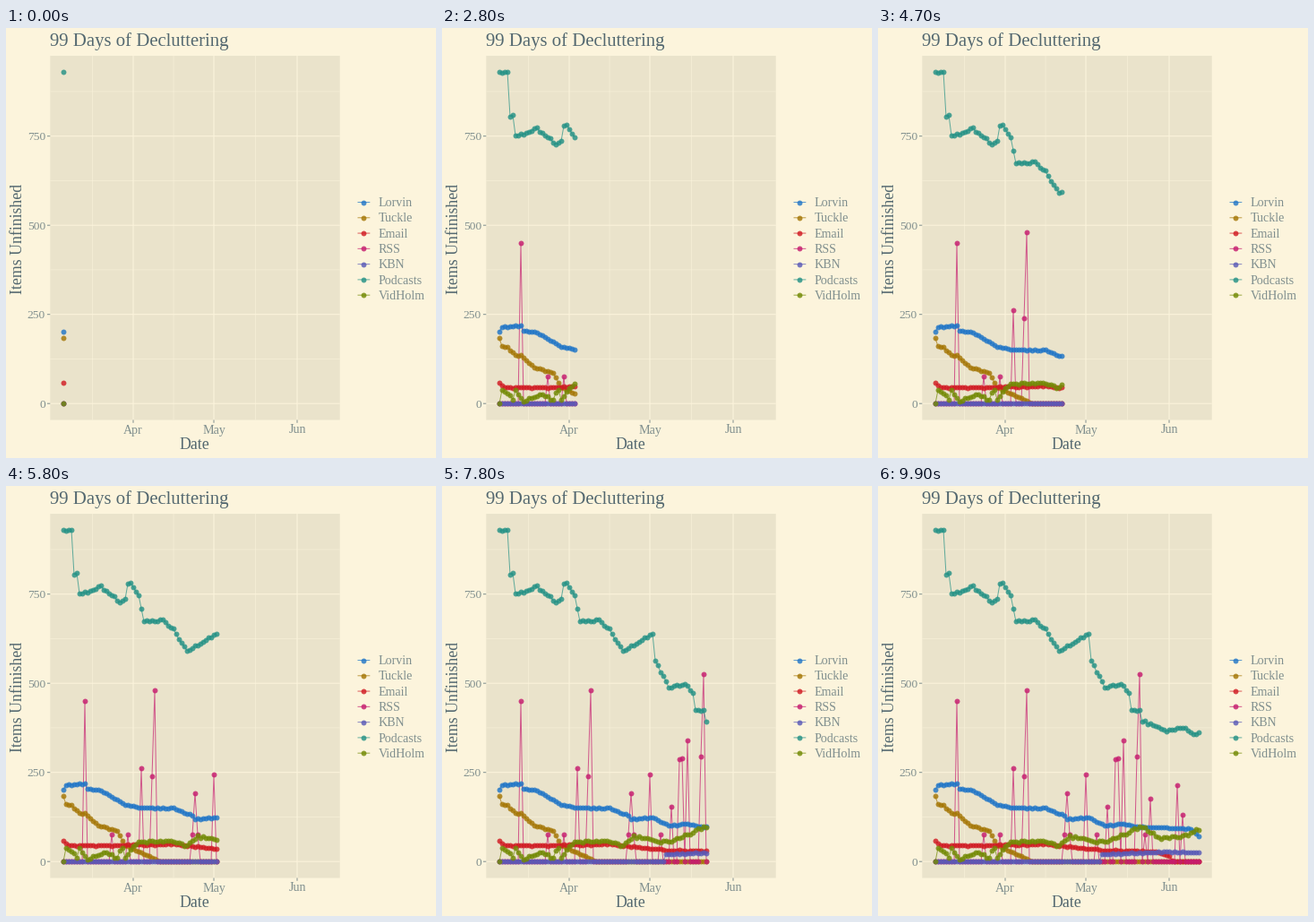
A matplotlib script for the animation above (10000 ms loop, 480x480 px).

```python
import numpy as np
import matplotlib.pyplot as plt
from matplotlib.animation import FuncAnimation
from matplotlib.patches import Rectangle

SIZE, DPI = 480, 80
PT = 72 / DPI  # points per pixel
DAYS, FRAMES = 99, 100

PAPER, PANEL = "#fcf4dc", "#eae3cb"
INK, MUTED = "#536870", "#81908f"
LEFT, RIGHT, TOP, BOTTOM = 49.3, 372.7, 31, 437.5

plt.rcParams["font.family"] = "Liberation Serif"
rng = np.random.default_rng(4)
days = np.arange(DAYS)


def px(day):
    return 64 + 3 * np.asarray(day)


def py(value):
    return 419.2 - 0.398 * np.asarray(value)


def trend(*turns, noise=0):
    """Straight runs between (day, value) turning points, with daily noise."""
    values = np.interp(days, *zip(*turns))
    jitter = rng.uniform(-noise, noise, DAYS)
    return np.where(values > 0, np.maximum(values + jitter, 0), 0)


def bursts(peaks):
    values = np.zeros(DAYS)
    for day, value in peaks.items():
        values[day] = value
    return values


articles = trend((0, 201), (1, 215), (8, 219), (9, 204), (14, 199), (23, 159),
                 (30, 150), (41, 150), (48, 129), (49, 119), (57, 124),
                 (63, 100), (70, 107), (75, 98), (95, 92), (98, 71), noise=1)
saved = trend((0, 183), (1, 161), (3, 158), (6, 135), (8, 135), (13, 101),
              (20, 86), (23, 46), (36, 0), noise=1)
email = trend((0, 57), (2, 44), (33, 47), (41, 50), (50, 41), (65, 31),
              (82, 28), (87, 17), (88, 3), (90, 0), noise=1.5)
rss = bursts({8: 449, 29: 261, 33: 239, 34: 480, 49: 192, 56: 245, 64: 155,
              67: 286, 68: 289, 70: 340, 75: 295, 76: 526, 80: 177, 90: 214,
              92: 132})
rss[[18, 24, 48, 50, 60, 78]] = 75
queue = trend((61, 0), (62, 20), (86, 28), (98, 25), noise=1)
podcasts = trend((0, 928), (3, 929), (4, 806), (5, 808), (6, 750), (14, 771),
                 (21, 728), (23, 735), (24, 777), (25, 785), (28, 745),
                 (30, 672), (37, 678), (41, 650), (46, 590), (57, 639),
                 (58, 563), (63, 489), (69, 499), (72, 471), (73, 424),
                 (76, 424), (77, 394), (86, 367), (93, 376), (95, 360),
                 (98, 359), noise=3)
videos = trend((0, 0), (1, 35), (3, 30), (5, 10), (6, 35), (9, 8), (16, 30),
               (20, 10), (22, 42), (23, 12), (27, 52), (38, 60), (46, 45),
               (50, 70), (63, 54), (77, 99), (84, 64), (93, 73), (98, 93),
               noise=4)

SERIES = [
    ("Lorvin", "#2176c7", articles),
    ("Tuckle", "#a57706", saved),
    ("Email", "#d11c24", email),
    ("RSS", "#c61c6f", rss),
    ("KBN", "#595ab7", queue),
    ("Podcasts", "#259286", podcasts),
    ("VidHolm", "#738a05", videos),
]

fig = plt.figure(figsize=(SIZE / DPI, SIZE / DPI), dpi=DPI, facecolor=PAPER)
ax = fig.add_axes([0, 0, 1, 1])
ax.set(xlim=(0, SIZE), ylim=(SIZE, 0), autoscale_on=False)
ax.axis("off")


def stroke(xs, ys, color, width=1, z=1, alpha=1):
    return ax.plot(xs, ys, color=color, lw=width * PT, zorder=z, alpha=alpha,
                   solid_capstyle="butt", snap=False)[0]


def dots(xs, ys, color, z):
    # scatter keeps sub-pixel centres
    return ax.scatter(xs, ys, s=(5.9 * PT) ** 2, color=color, linewidths=0,
                      alpha=0.82, zorder=z)


def label(x, y, text, size, color, **kw):
    ax.text(x, y, text, fontsize=size * PT, color=color, **kw)


def grid(xs, ys, width):
    for x in xs:
        stroke([x, x], [TOP, BOTTOM], PAPER, width)
    for y in ys:
        stroke([LEFT, RIGHT], [y, y], PAPER, width)


ax.add_patch(Rectangle((LEFT, TOP), RIGHT - LEFT, BOTTOM - TOP,
                       color=PANEL, lw=0, zorder=0, snap=False))
months = {"Apr": 142, "May": 232, "Jun": 325}
levels = range(0, 751, 250)
grid([96.5, 187, 278.5], py(range(125, 876, 250)), 0.53)
grid(months.values(), py(levels), 1.07)

for name, x in months.items():
    stroke([x, x], [BOTTOM, BOTTOM + 3.3], MUTED)
    label(x, 452.5, name, 14, MUTED, ha="center")
for level in levels:
    y = py(level)
    stroke([LEFT - 3.3, LEFT], [y, y], MUTED)
    label(44, y + 4.6, str(level), 13.5, MUTED, ha="right")

label(49, 20, "99 Days of Decluttering", 20.75, INK)
label(210.5, 470, "Date", 17.8, INK, ha="center")
label(18, 235, "Items Unfinished", 17.8, INK, rotation=90,
      rotation_mode="anchor", ha="center", va="baseline")

lines, points = [], []
for i, (name, color, _) in enumerate(SERIES):
    y = 194.5 + 17.28 * i
    stroke([392.5, 406.3], [y, y], color, alpha=0.7)
    dots([399.4], [y], color, 3)
    label(416, y + 4.6, name, 14, MUTED)
    lines.append(stroke([], [], color, z=4 + i / 10, alpha=0.7))
    points.append(dots([], [], color, 5 + i / 10))

arrival = np.round(days * (FRAMES - 1) / (DAYS - 1))


def draw(frame):
    shown = days[arrival <= frame]
    path = np.append(shown, np.interp(frame, arrival, days))
    for (_, _, values), line, point in zip(SERIES, lines, points):
        line.set_data(px(path), py(np.interp(path, days, values)))
        point.set_offsets(np.column_stack([px(shown), py(values[shown])]))
    return lines + points


anim = FuncAnimation(fig, draw, frames=FRAMES, interval=100, repeat=True,
                     repeat_delay=0, blit=False)
plt.show()
```
